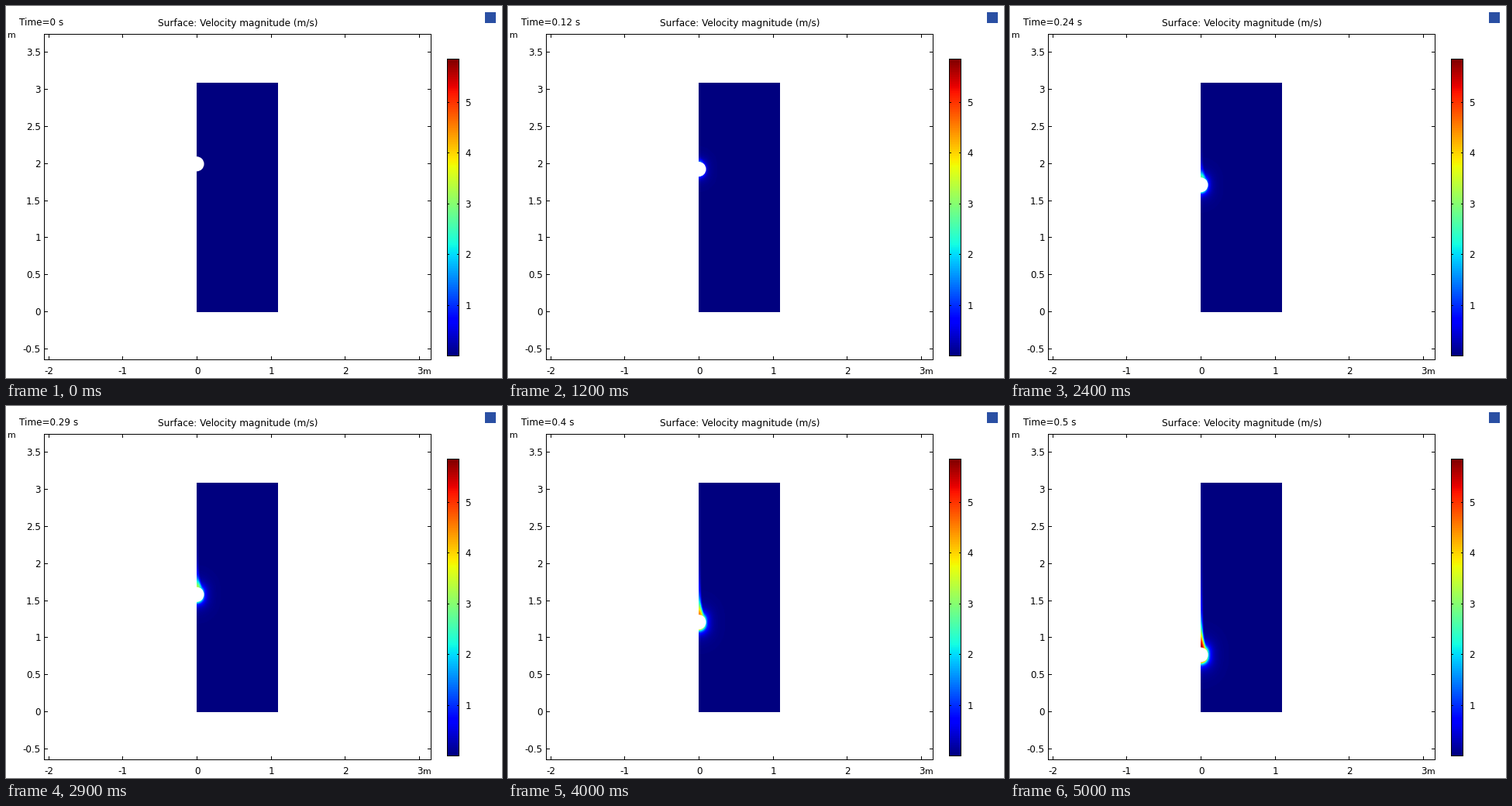
Recreate the animation shown at these times as a matplotlib script. Size 640 px wide and 480 px high, loop 5100 ms.

```python
import numpy as np
import matplotlib.pyplot as plt
from matplotlib.animation import FuncAnimation
from matplotlib.patches import Circle, Rectangle

plt.rcParams["font.family"] = "DejaVu Sans"

PX = 0.72               # points per pixel at 100 dpi
FRAMES, STEP_MS = 51, 100
G = 9.81
UNIT = 95.6             # pixels per metre
RADIUS = 0.1 * UNIT
V_MAX = 5.85
LEFT, RIGHT, TOP, BOTTOM = 246, 351, 99, 395   # fluid domain
START = BOTTOM - 2 * UNIT

fig = plt.figure(figsize=(6.4, 4.8), dpi=100, facecolor="white")
ax = fig.add_axes([0, 0, 1, 1])
ax.axis("off")


def line(x1, y1, x2, y2):
    """One-pixel line; whole numbers snap to that pixel column or row."""
    ax.plot([x1, x2], [y1, y2], color="black", lw=PX, antialiased=False,
            solid_capstyle="projecting", snap=True, zorder=5)


def box(x1, y1, x2, y2):
    line(x1, y1, x2, y1)
    line(x1, y2, x2, y2)
    line(x1, y1, x1, y2)
    line(x2, y1, x2, y2)


def label(x, y, text, ha="left", size=12):
    return ax.text(x, y, text, ha=ha, va="baseline", fontsize=size * PX,
                   color="black", zorder=6)


def draw_axes():
    left, top, right, bottom = 49, 36, 548, 456
    box(left, top, right, bottom)
    for v in range(-2, 4):
        x = round(LEFT + v * UNIT)
        line(x, top, x, top + 4)
        line(x, bottom - 4, x, bottom)
        label(x + 0.5, 475, f"{v}", "center")
    for v in np.arange(-0.5, 3.6, 0.5):
        y = round(BOTTOM - 1 - v * UNIT)
        line(left, y, left + 4, y)
        line(right - 4, y, right, y)
        label(45, y + 5, f"{v:g}", "right")
    label(538, 475, "m", size=11)
    label(1.6, 41, "m", size=11)
    label(196, 26, "Surface: Velocity magnitude (m/s)", size=12.1)


def draw_colorbar():
    left, top, right, bottom = 569, 68, 584, 451
    ramp = np.linspace(1, 0, bottom - top + 1)[:, None]
    ax.imshow(ramp, cmap="jet", vmin=0, vmax=1, aspect="auto",
              extent=(left, right + 1, bottom + 1, top))
    box(left, top, right, bottom)
    for v in range(1, 6):
        y = round(bottom - v * (bottom - top) / V_MAX)
        line(left, y, left + 2, y)
        line(right - 2, y, right, y)
        label(592.6, y + 5, f"{v}")


# Sample points of the fluid domain, two per pixel
gx = np.arange(LEFT, RIGHT, 0.5) + 0.25 - LEFT
gy = np.arange(TOP, BOTTOM, 0.5) + 0.25
GX, GY = np.meshgrid(gx, gy)


def velocity(speed, fall, cy):
    """Flow pushed aside by a falling sphere, plus the wake above it."""
    h = cy - GY
    r = np.maximum(np.hypot(GX, h), 1e-6)
    cos2 = (h / r) ** 2
    flow = (RADIUS / np.maximum(r, RADIUS)) ** 3.5 * np.sqrt(0.25 + 0.75 * cos2)

    above = np.maximum(h - RADIUS, 0)
    length = 22 * (max(fall, 0.01) / 117) ** 0.7
    width = 2.5 + 4.5 * np.exp(-above / 10)
    wake = 1.15 * np.exp(-(GX / width) ** 3) / (1 + (above / length) ** 2)
    return speed * np.maximum(flow, np.where(h > 0, wake, 0))


draw_axes()
draw_colorbar()
ax.add_patch(Rectangle((618, 8), 14, 14, color="#2a4fa3", lw=0))
field = ax.imshow(np.zeros_like(GX), cmap="jet", vmin=0, vmax=V_MAX,
                  aspect="auto", extent=(LEFT, RIGHT, BOTTOM, TOP), zorder=2)
ball = ax.add_patch(Circle((LEFT, START), RADIUS, color="white", lw=0, zorder=3))
clock = label(17, 25, "")
ax.set_xlim(0, 640)
ax.set_ylim(480, 0)


def update(i):
    t = i / 100
    fall = 0.5 * G * t * t * UNIT
    cy = START + fall
    field.set_data(velocity(G * t, fall, cy))
    ball.center = (LEFT, cy)
    clock.set_text(f"Time={t:g} s")
    return field, ball, clock


anim = FuncAnimation(fig, update, frames=FRAMES, interval=STEP_MS,
                     repeat=True, repeat_delay=0)
plt.show()
```
